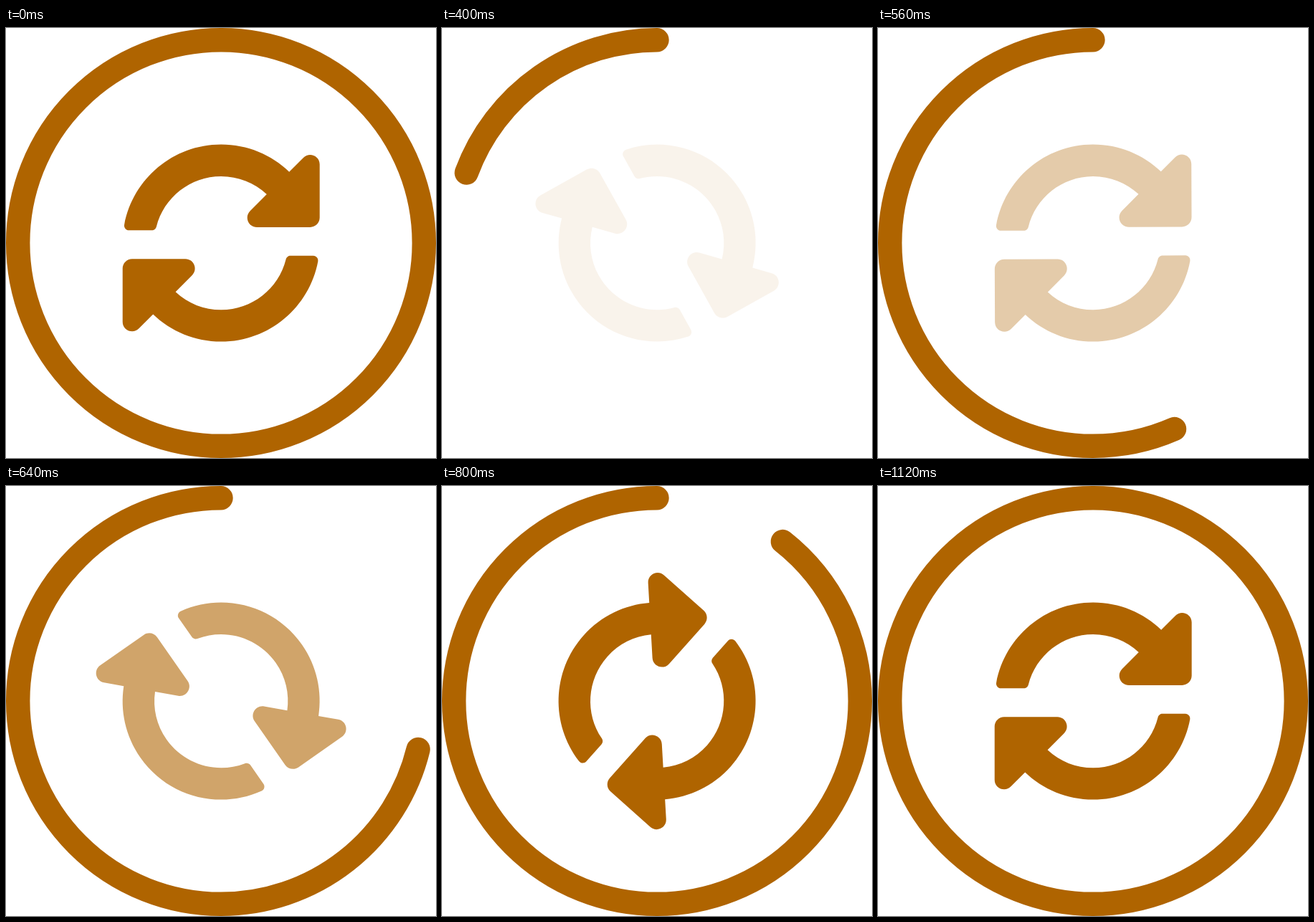
An HTML page with a canvas that plays this animation: 600 by 600 pixels, repeating every 4 s.

```html
<!DOCTYPE html>
<html lang="en">
<head>
<meta charset="utf-8">
<title>Refresh</title>
<style>
  html, body { margin: 0; height: 100%; overflow: hidden; background: #fff; }
  canvas { display: block; width: 100vw; height: 100vh; }
</style>
</head>
<body>
<canvas id="stage" width="600" height="600"></canvas>
<script>
const ctx = document.getElementById('stage').getContext('2d');
const COLOR = '#af6400';
const LOOP = 4000, STEP = 40, START = 200, END = 1120, FADE_END = 800;
const TAU = Math.PI * 2;

// One curved arrow in a 512-unit box; the second is its half-turn copy.
const arrow = new Path2D(
  'M370.72 133.28C339.458 104.008 298.888 87.962 255.848 88' +
  'c-77.458.068-144.328 53.178-162.791 126.85-1.344 5.363-6.122 9.15-11.651 9.15' +
  'H24.103c-7.498 0-13.194-6.807-11.807-14.176C33.933 94.924 134.813 8 256 8' +
  'c66.448 0 126.791 26.136 171.315 68.685L463.03 40.97' +
  'C478.149 25.851 504 36.559 504 57.941V192c0 13.255-10.745 24-24 24' +
  'H345.941c-21.382 0-32.09-25.851-16.971-40.971z');

// Cubic easing with flat ends: control points (a, 0) and (b, 1).
function ease(a, b, x) {
  if (x <= 0) return 0;
  if (x >= 1) return 1;
  let lo = 0, hi = 1;
  for (let i = 0; i < 30; i++) {
    const s = (lo + hi) / 2, r = 1 - s;
    if (3 * r * r * s * a + 3 * r * s * s * b + s * s * s < x) lo = s;
    else hi = s;
  }
  return lo * lo * (3 - 2 * lo);
}

function drawRing(part) {
  if (part <= 0) return;
  const top = -TAU / 4;
  ctx.beginPath();
  ctx.arc(300, 300, 283.3, top, top - TAU * part, true);
  ctx.lineWidth = 33.4;
  ctx.lineCap = 'round';
  ctx.strokeStyle = COLOR;
  ctx.stroke();
}

function drawArrows(angle, alpha) {
  ctx.fillStyle = COLOR;
  ctx.globalAlpha = alpha;
  for (const turn of [0, Math.PI]) {
    ctx.save();
    ctx.translate(300.2, 300.1);
    ctx.rotate(angle + turn);
    ctx.scale(0.5544, 0.5544);
    ctx.translate(-256, -256);
    ctx.fill(arrow);
    ctx.restore();
  }
  ctx.globalAlpha = 1;
}

function draw(ms) {
  let t = Math.floor((ms % LOOP) / STEP) * STEP;
  if (t < STEP) t = END;
  const x = (t - START) / (END - START);
  ctx.fillStyle = '#fff';
  ctx.fillRect(0, 0, 600, 600);
  drawRing(ease(0.333, 0.29, x));
  drawArrows(TAU * ease(0.333, 0.378, x),
             ease(0.77, 0.75, (t - START) / (FADE_END - START)));
}

const begin = performance.now();
function tick() {
  draw(performance.now() - begin);
  requestAnimationFrame(tick);
}
tick();
</script>
</body>
</html>
```
